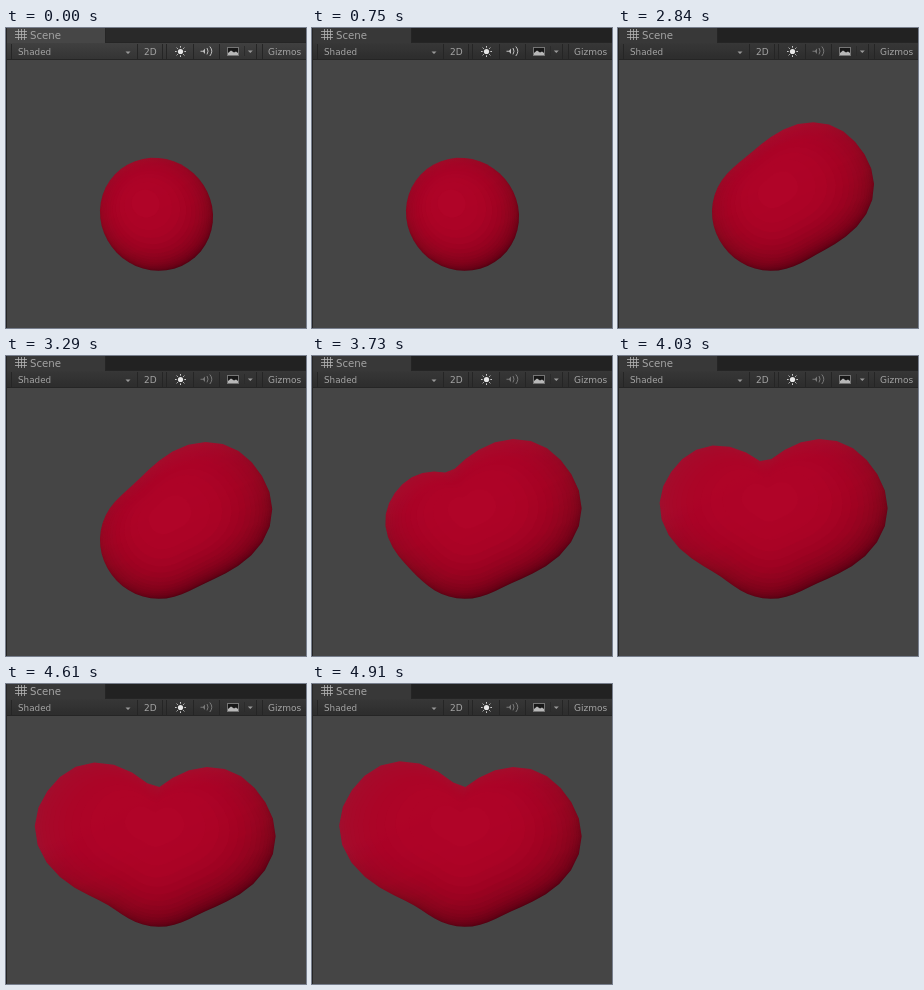
An HTML page for the animation above (6.11 s loop, 300x300 px).

```html
<!DOCTYPE html>
<html lang="en">
<head>
<meta charset="utf-8">
<title>Sphere to heart</title>
<style>
  html, body { margin: 0; width: 100%; height: 100%; overflow: hidden; background: #454545; }
  svg { display: block; width: 100vw; height: 100vh; }
  text { font-family: "DejaVu Sans", sans-serif; font-size: 9px; fill: #a4a4a4; }
  .shade { opacity: 0; }
  .dim .shade { opacity: 1; }
  .muted #sound { opacity: .5; }
</style>
</head>
<body>
<svg id="stage" viewBox="0 0 300 300">
  <defs>
    <linearGradient id="bar" x2="0" y2="1">
      <stop stop-color="#404040"/><stop offset="1" stop-color="#343434"/>
    </linearGradient>
    <linearGradient id="edge" gradientUnits="userSpaceOnUse" x1="125" y1="120" x2="180" y2="240">
      <stop stop-color="#9e1030"/><stop offset=".4" stop-color="#860820"/><stop offset="1" stop-color="#480010"/>
    </linearGradient>
    <path id="blob"/>
  </defs>

  <rect width="300" height="300" fill="#454545"/>
  <use href="#blob" fill="url(#edge)"/>
  <g id="glow" fill="#b00428"></g>

  <!-- tab strip and toolbar -->
  <rect width="300" height="15" fill="#292929"/>
  <rect width="99" height="15" fill="#464646"/>
  <rect y="15" width="300" height="16" fill="url(#bar)"/>
  <g class="shade">
    <rect width="300" height="15" fill="#222"/>
    <rect width="99" height="15" fill="#383838"/>
    <rect y="15" width="300" height="16" fill="#000" fill-opacity=".14"/>
  </g>
  <path d="M99.5 0V15M99 14.5H300M0 31.5H300M.5 0V300M5.5 16V31M131.5 16V31M156.5 16V31M160.5 16V31M187.5 16V31M213.5 16V31M250.5 16V31M256.5 16V31" stroke="#252525"/>
  <path d="M238.5 18V28" stroke="#2b2b2b"/>
  <path d="M12.5 1V12M15.5 1V12M18.5 1V12M9 3.5H21M9 6.5H21M9 9.5H21" stroke="#b4b4b4" stroke-width=".8"/>
  <text x="24" y="10.5" style="font-size:10.2px">Scene</text>
  <text x="12" y="26.5" style="font-size:8.8px">Shaded</text>
  <text x="138" y="26.5">2D</text>
  <text x="262" y="26.5">Gizmos</text>
  <path d="M119.5 23.5h5l-2.5 2.5zM241.8 22.5h5l-2.5 2.5z" fill="#999"/>
  <g transform="translate(174.5 23.5)" stroke="#c8c8c8">
    <circle r="2.6" fill="#e8e8e8" stroke="none"/>
    <path d="M0-5.5V-3.8M0 5.5V3.8M-5.5 0H-3.8M5.5 0H3.8M-3.9-3.9l1.2 1.2M3.9 3.9l-1.2-1.2M-3.9 3.9l1.2-1.2M3.9-3.9l-1.2 1.2"/>
  </g>
  <g id="sound" fill="none" stroke="#c0c0c0">
    <path d="M194.5 22.8h2.5l2-2.3v5.6l-2-2.3h-2.5z" fill="#c0c0c0" stroke="none"/>
    <path d="M201 20q2 3.2 0 6.4M203.8 18.5q4 4.7 0 9.5"/>
  </g>
  <rect x="221.5" y="19.5" width="11" height="8" fill="#181818" stroke="#757575"/>
  <path d="M222 27V25l3-2.5 3 2 2-1 2 1.5v2z" fill="#b8b8b8"/>
</svg>
<script>
  const LOOP = 6110, FOCUS = 750, START = 2545, STEP = 147.5, DABS = 8;
  const CX = 150.5, CY = 186.3, RADIUS = 56.5, FACET = 8, LAYERS = 16;

  // each lobe: direction and width in degrees, height, first dab, pull on the highlight
  const lobes = [
    { angle: -35, width: 53, height: 73, first: .17, light: [24, -16] },
    { angle: -143, width: 48.5, height: 79, first: .33, light: [-12, -20] }
  ];

  const $ = id => document.getElementById(id);
  const rad = deg => deg * Math.PI / 180;
  const stage = $('stage'), blob = $('blob'), glow = $('glow');

  // equal steps of brightness, spaced as on a round surface
  const layers = Array.from({ length: LAYERS }, (_, i) => {
    const el = document.createElementNS('http://www.w3.org/2000/svg', 'use');
    el.setAttribute('href', '#blob');
    el.setAttribute('fill-opacity', 1 / (LAYERS - i));
    glow.append(el);
    return { el, scale: Math.sqrt(1 - ((i + .5) / LAYERS) ** 2) };
  });

  function grow(lobe, dab) {
    if (dab < 0) return 0;
    if (dab === 0) return lobe.first;
    return 1 - .37 * (1 - Math.min(dab / DABS, 1)) ** 2;
  }

  function bump(lobe, deg) {
    const turn = Math.abs(deg - lobe.angle) % 360;
    const away = Math.min(turn, 360 - turn);
    return lobe.height * Math.exp(-((away / lobe.width) ** 2.6));
  }

  function outline(amounts) {
    const points = [];
    for (let deg = 0; deg < 360; deg += FACET) {
      const stretch = 1.2 * Math.cos(2 * rad(deg - 45));
      const r = RADIUS + stretch + Math.max(...lobes.map((l, i) => amounts[i] * bump(l, deg)));
      points.push([CX + r * Math.cos(rad(deg)), CY + r * Math.sin(rad(deg))]);
    }
    return 'M' + points.map(p => p.map(v => v.toFixed(2)).join(' ')).join('L') + 'Z';
  }

  function sculpt(step) {
    const amounts = lobes.map((l, i) => grow(l, step - i * DABS));
    const [lx, ly] = [136, 172].map((v, axis) =>
      lobes.reduce((sum, l, i) => sum + amounts[i] * l.light[axis], v));
    blob.setAttribute('d', outline(amounts));
    for (const { el, scale } of layers) {
      el.setAttribute('transform', `translate(${lx * (1 - scale)} ${ly * (1 - scale)}) scale(${scale})`);
    }
  }

  let shown;
  function draw() {
    const t = performance.now() % LOOP;
    const step = t < START ? -1 : Math.min(2 * DABS, Math.floor((t - START) / STEP));
    stage.classList.toggle('dim', t >= FOCUS);
    stage.classList.toggle('muted', t >= START);
    if (step !== shown) sculpt(shown = step);
    requestAnimationFrame(draw);
  }
  draw();
</script>
</body>
</html>
```
